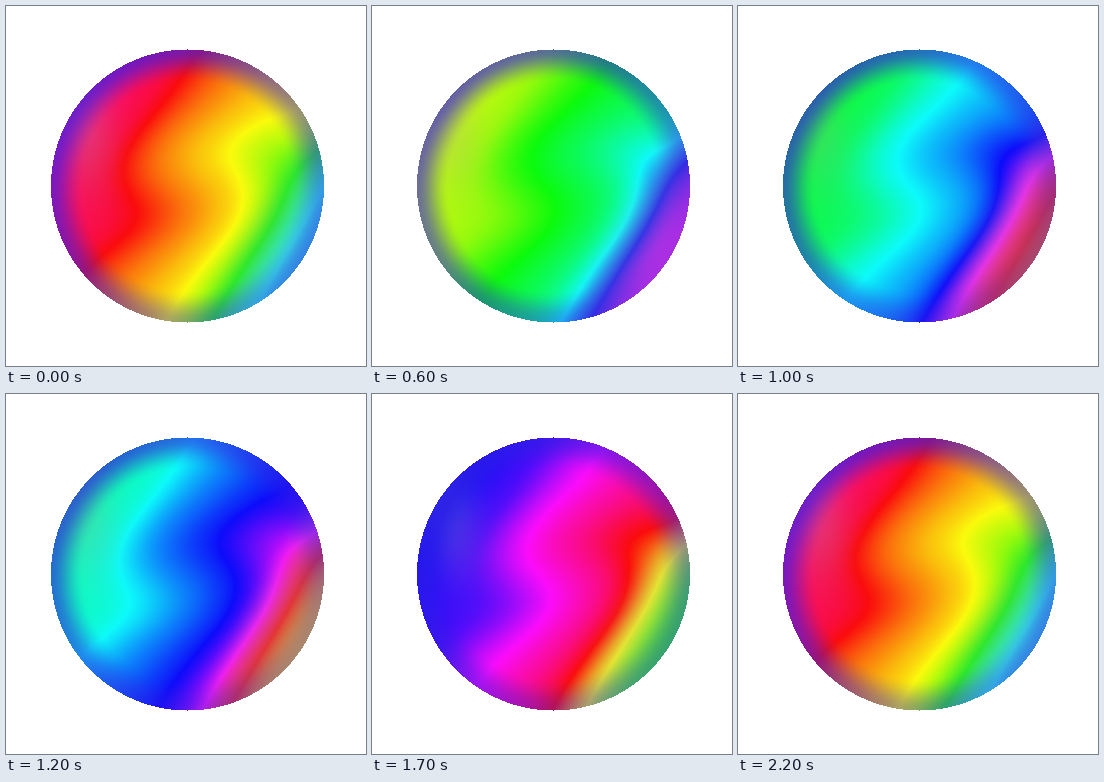
Write an HTML page with a canvas that moves like this. It is 360 px wide and 360 px high and loops after 2.3 s.

```html
<!DOCTYPE html>
<html lang="en">
<head>
<meta charset="utf-8">
<title>Rainbow sphere</title>
<style>
  html, body { margin: 0; width: 100%; height: 100%; overflow: hidden; background: #fff; }
  canvas { display: block; width: 360px; height: 360px; }
</style>
</head>
<body>
<canvas id="stage" width="360" height="360"></canvas>
<script>
const SIZE = 360, CX = 181.5, CY = 180, R = 136.5;
const STEP = 100, STEPS = 23, TURN = 360 / 22;
const RIM = [50, 30, 228], HAZE = 165;

// Hue across the sphere, one knot every 20 px
const KNOTS = [-46, -42, -38, -33, -28, -23, -17, -5, 8, 19, 28, 37, 46, 60,
  84, 122, 162, 192, 205, 212, 216];

const ctx = document.getElementById('stage').getContext('2d');
const image = ctx.createImageData(SIZE, SIZE);
image.data.fill(255);

const bell = (x, y, cx, cy, w, h) =>
  Math.exp(-(((x - cx) / w) ** 2) - ((y - cy) / h) ** 2);

function smooth(a, b, v) {
  const t = Math.max(0, Math.min(1, (v - a) / (b - a)));
  return t * t * (3 - 2 * t);
}

function baseHue(u) {
  const p = Math.max(1, Math.min(KNOTS.length - 2.001, u / 20 + 1));
  const i = Math.floor(p), f = p - i;
  const [a, b, c, d] = KNOTS.slice(i - 1, i + 3);
  return b + f / 2 * (c - a + f * (2 * a - 5 * b + 4 * c - d + f * (3 * (b - c) + d - a)));
}

// Slanted bands with an S-shaped bend through the middle
function hueAt(x, y) {
  const u = x + 0.55 * (y - 180);
  const s = (y - 178) / 40;
  const bend = 33 * s * Math.exp((1 - s * s) / 2) * Math.exp(-(((u - 175) / 85) ** 2));
  return baseHue(u - bend - 30 * bell(x, y, 312, 112, 45, 45));
}

const points = [];
for (let y = 0; y < SIZE; y++) {
  for (let x = 0; x < SIZE; x++) {
    const dx = (x + 0.5 - CX) / R, dy = (y + 0.5 - CY) / R;
    const q = Math.hypot(dx, dy);
    if (q > 1) continue;
    const u = x + 0.55 * (y - 180);
    points.push({
      at: (y * SIZE + x) * 4,
      hue: hueAt(x, y),
      // the rim glow is weaker towards the lower right
      rim: (0.5 - 0.13 * (dx + dy)) * smooth(0.76, 1, q),
      haze: 0.22 * bell(x, y, 82, 130, 28, 55) + 0.27 * smooth(250, 295, u)
    });
  }
}

// The colour wheel lingers a little on cyan and hurries through red
function wheel(angle) {
  return angle + 7 * Math.cos((angle - 20) * Math.PI / 180);
}

function channel(hue, n) {
  const k = (((n + hue / 60) % 6) + 6) % 6;
  return 250 - 238 * Math.max(0, Math.min(k, 4 - k, 1));
}

function draw(step) {
  const shift = step * TURN;
  for (const p of points) {
    const hue = wheel(p.hue + shift);
    for (let c = 0; c < 3; c++) {
      let v = channel(hue, 5 - 2 * c);
      v += (HAZE - v) * p.haze;
      image.data[p.at + c] = v + (RIM[c] - v) * p.rim;
    }
  }
  ctx.putImageData(image, 0, 0);
}

let last = -1;
function tick() {
  const step = Math.floor(performance.now() / STEP) % STEPS;
  if (step !== last) draw(last = step);
  requestAnimationFrame(tick);
}
tick();
</script>
</body>
</html>
```
